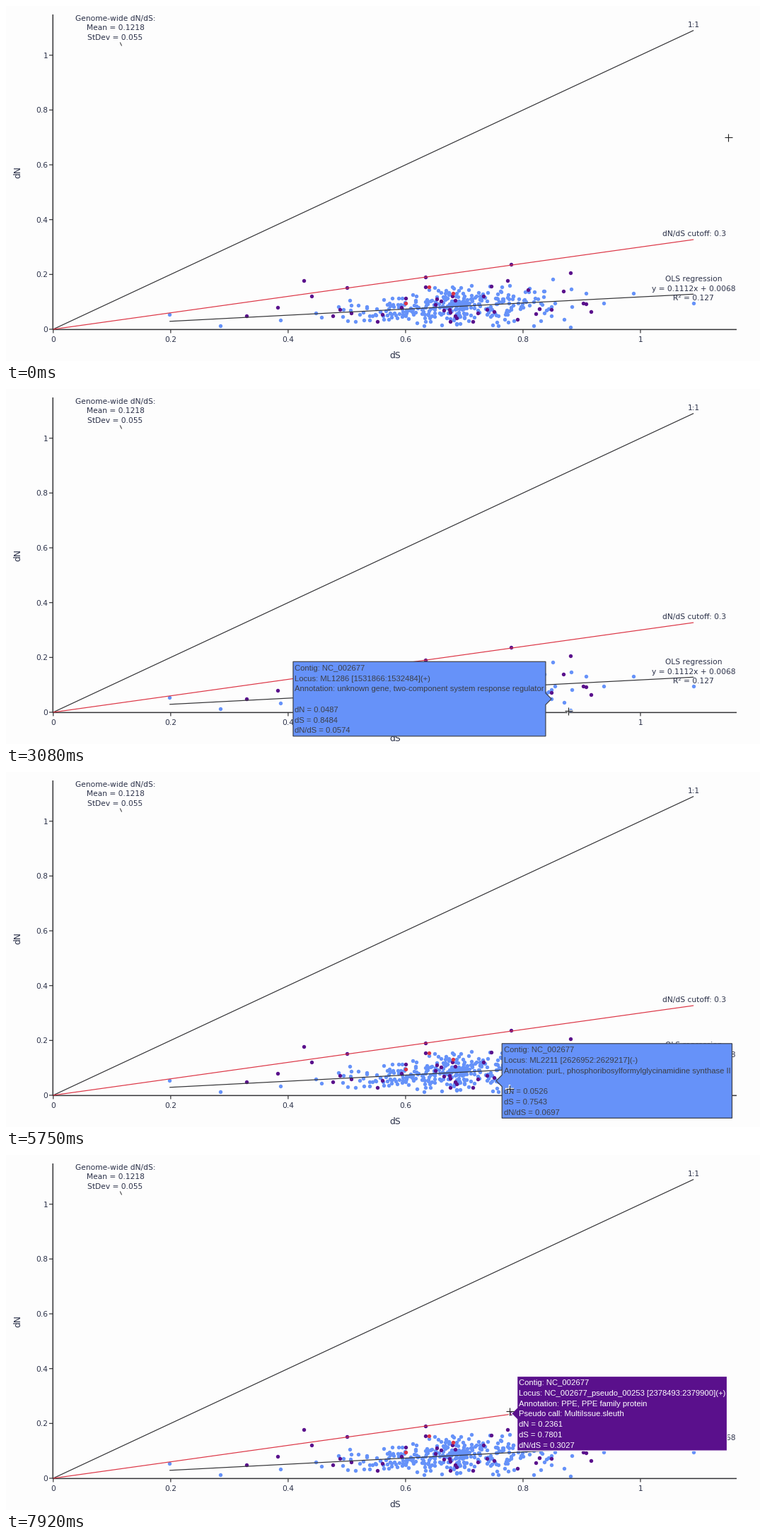
These frames come from a looping animation (1066 px wide and 503 px high, 8 s). A matplotlib script:

```python
import numpy as np
import matplotlib.pyplot as plt
from matplotlib.animation import FuncAnimation
from matplotlib.patches import Polygon

W, H, DPI = 1066, 503, 64
PT = 72 / DPI                      # points per pixel
FRAMES, INTERVAL = 200, 40

INK, LABEL, DARK = "#333336", "#2a3048", "#3c3f48"
BLUE, PURPLE, RED = "#6692f9", "#5a108c", "#dc3545"
X0, Y0, SX, SY = 66.8, 458.0, 830.2, 388.3

fig = plt.figure(figsize=(W / DPI, H / DPI), dpi=DPI, facecolor="#fdfdfd")
ax = fig.add_axes([0, 0, 1, 1])
ax.set_xlim(0, W)
ax.set_ylim(H, 0)
ax.axis("off")


def sx(ds):
    return X0 + SX * ds


def sy(dn):
    return Y0 - SY * dn


def fit(ds):
    return 0.1112 * ds + 0.0068


def line(xs, ys, color=INK, width=1.2):
    ax.plot(xs, ys, color=color, lw=width * PT, zorder=3,
            solid_capstyle="butt", snap=False)


def label(x, y, s, size=10.65, ha="center"):
    ax.text(x, y + 0.365 * size, s, size=size * PT, ha=ha, va="baseline",
            color=LABEL, family="DejaVu Sans", zorder=5)


def dots(pts, color, z=2.0):
    x, y = np.asarray(pts).T
    ax.scatter(x, y, s=(5.4 * PT) ** 2, color=color, linewidths=0, zorder=z)


# axes
line([66.3, 66.3], [12, 459], width=1.5)
line([66, 1033], [458.4, 458.4], width=1.5)
for v in np.arange(6) / 5:
    line([61, 66], [sy(v)] * 2)
    line([sx(v)] * 2, [459, 463.5])
    label(59.5, sy(v), f"{v:g}", ha="right")
    label(sx(v), 472, f"{v:g}")
label(550, 494.5, "dS", 12.4)
ax.text(20.5, 235, "dN", size=12.4 * PT, rotation=90, ha="center",
        va="baseline", rotation_mode="anchor", color=LABEL,
        family="DejaVu Sans")

# reference lines
ds = np.array([0, 1.0905])
line(sx(ds), sy(ds))
line(sx(ds), sy(0.3 * ds), RED)
ds[0] = 0.198
line(sx(ds), sy(fit(ds)))
line([161.3, 163.6], [51.5, 56.5], width=1)

label(972.5, 26, "1:1")
label(973, 322, "dN/dS cutoff: 0.3")
for k, s in enumerate(["OLS regression", "y = 0.1112x + 0.0068", "R² = 0.127"]):
    label(972, 386.5 + 13.5 * k, s)
for k, s in enumerate(["Genome-wide dN/dS:", "Mean = 0.1218", "StDev = 0.055"]):
    label(154.5, 17 + 13.5 * k, s)

rng = np.random.default_rng(7)


def cloud(n, mid, spread):
    """Genes scattered round the fit, looser to the right."""
    x = rng.normal(mid, spread, 2 * n)
    y = sy(fit((x - X0) / SX)) + rng.normal(0, 1, 2 * n) * (x - 200) / 33
    ok = (x > 355) & (x < 812) & (y > 388) & (y < 455)
    return np.c_[x, y][ok][:n]


dots(cloud(325, 642, 78), BLUE)
dots(cloud(32, 612, 88), PURPLE, 2.2)
dots([(231, 437), (303, 453), (773, 387), (820, 407), (845, 421),
      (886.5, 407), (972, 421)], BLUE)
dots([(340, 439), (421, 389), (432, 411), (482, 398.5), (593, 383.5),
      (797.5, 378), (788, 404), (816, 421), (820, 422), (827, 432.5)],
     PURPLE, 2.2)
dots([(597.5, 398), (632, 406.5), (565, 420.5)], RED, 2.3)


def tooltip(ds, dn, ratio, locus, note, extra="", fill=BLUE, ink=DARK, side=1):
    """A gene with its hover box; side is 1 for right, -1 for left."""
    rows = ["Contig: NC_002677", f"Locus: {locus}", f"Annotation: {note}",
            extra, f"dN = {dn:.4f}", f"dS = {ds:.4f}", f"dN/dS = {ratio:.4f}"]
    px, py, half, gap, step = sx(ds), sy(dn), 52.8, 8.2, 14.75
    dots([(px, py)], fill)
    texts = [ax.text(0, py - 40.2 + step * k, s, size=11.3 * PT, color=ink,
                     family="Liberation Sans", va="baseline", zorder=11)
             for k, s in enumerate(rows)]
    rend = fig.canvas.get_renderer()
    width = max(t.get_window_extent(rend).width for t in texts) + 4.5
    near, far = px + side * gap, px + side * (gap + width)
    for t in texts:
        t.set_x(min(near, far) + 2.3)
    box = Polygon([(px, py), (near, py - gap), (near, py - half),
                   (far, py - half), (far, py + half), (near, py + half),
                   (near, py + gap)],
                  fc=fill, ec=ink, lw=1.2 * PT, zorder=10, joinstyle="miter")
    ax.add_patch(box)
    return [box] + texts


tips = [  # start, end, artists
    (2900, 4060, tooltip(
        0.8484, 0.0487, 0.0574, "ML1286 [1531866:1532484](+)",
        "unknown gene, two-component system response regulator", side=-1)),
    (4060, 5150, tooltip(
        0.8299, 0.0309, 0.0372, "ML1130 [1320963:1322046](+)",
        "thrC, threonine synthase")),
    (5150, 7480, tooltip(
        0.7543, 0.0526, 0.0697, "ML2211 [2626952:2629217](-)",
        "purL, phosphoribosylformylglycinamidine synthase II")),
    (7820, 8000, tooltip(
        0.7801, 0.2361, 0.3027, "NC_002677_pseudo_00253 [2378493:2379900](+)",
        "PPE, PPE family protein", "Pseudo call: MultiIssue.sleuth",
        PURPLE, "white")),
]

# mouse cursors
cross = [ax.plot([], [], "+", ms=size * PT, mew=w * PT, color=c, zorder=20)[0]
         for size, w, c in [(12, 2.4, "#fdfdfd"), (11, 1.1, "#222222")]]

ARROW = np.array([(-5.5, -1), (0.5, -1), (0.5, -4), (5.5, 0), (0.5, 4),
                  (0.5, 1), (-5.5, 1)])
POINTER = np.array([(0, 0), (0, 12.5), (2.9, 9.9), (5, 14.7), (7.2, 13.7),
                    (5.1, 9.1), (9, 8.8)])


def shape(pts, fc, ec, lw):
    return ax.add_patch(Polygon(pts, fc=fc, ec=ec, lw=lw * PT, zorder=20))


shade = shape(ARROW, "#b5b5b5", "#c9c9c9", 1.6)
arrow = shape(ARROW, "#111111", "none", 0)
pointer = shape(POINTER, "#151515", "#f4f4f4", 1)

HOME = np.array([1021.0, 186.0])
MOVES = [  # start, end, where the cursor comes to rest
    (420, 1000, (963, 467)), (1000, 1500, (945, 466)),
    (1920, 2420, (918, 458)), (2420, 3080, (795, 456)),
    (3580, 3920, (772, 456)), (3920, 4580, (741, 449)),
    (4920, 5250, (715, 449)), (5580, 6500, (685, 450)),
    (7000, 7920, (712, 363)),
]


def cursor(t):
    pos = HOME
    for start, end, goal in MOVES:
        pos = pos + (goal - pos) * np.clip((t - start) / (end - start), 0, 1)
    return pos


def draw(i):
    t = int((i * INTERVAL + 21) * 0.012) / 0.012   # twelve steps a second
    pos = cursor(t)
    on_arrow = 980 < t < 1980
    on_pointer = 1980 <= t < 2900
    for c in cross:
        c.set_data(pos[:1], pos[1:])
        c.set_visible(not (on_arrow or on_pointer))
    for part, pts, on in [(arrow, ARROW, on_arrow),
                          (shade, ARROW + (0.3, 1), on_arrow),
                          (pointer, POINTER, on_pointer)]:
        part.set_xy(pts + pos)
        part.set_visible(on)
    for start, end, parts in tips:
        for p in parts:
            p.set_visible(start <= t < end)
    return []


anim = FuncAnimation(fig, draw, frames=FRAMES, interval=INTERVAL,
                     init_func=lambda: draw(0), repeat=True, repeat_delay=0)
plt.show()
```
